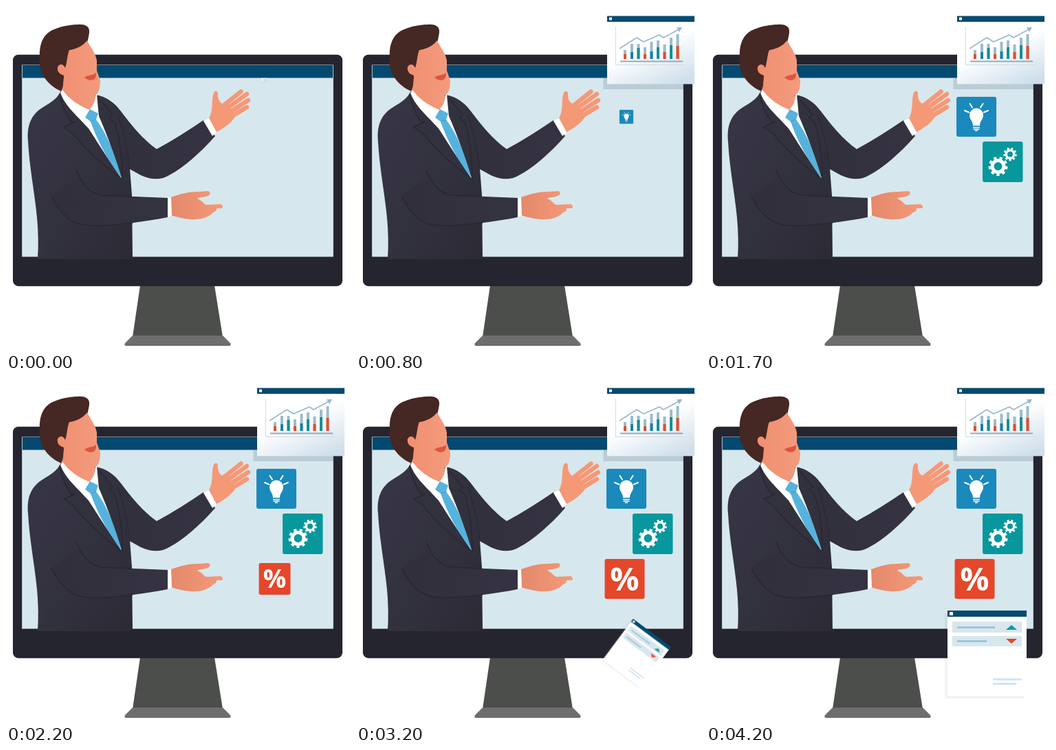
Recreate the animation shown at these times as an HTML page without scripts. Size 500 by 500 pixels, loop 5000 ms.

```html
<!DOCTYPE html>
<html lang="en">
<head>
<meta charset="utf-8">
<title>Presenter on screen</title>
<style>
  html, body { margin: 0; width: 100%; height: 100%; overflow: hidden; background: #fff; }
  svg { display: block; width: 100%; height: 100%; }
  .pop { animation: 5s step-end infinite; }
  .chart { animation-name: chart; transform-origin: 372px 110px; }
  .bulb { animation-name: bulb; transform-origin: 393px 161px; }
  .gears { animation-name: gears; transform-origin: 430.5px 226.5px; }
  .percent { animation-name: percent; transform-origin: 390.5px 292px; }
  .paper { animation-name: paper; transform-origin: 408px 400px; }

  /* every ramp advances once per 100 ms */
  @keyframes chart {
    0% { transform: scale(.063); animation-timing-function: steps(6); }
    12% { transform: scale(.938); }
    14%, 100% { transform: scale(1); }
  }
  @keyframes bulb {
    0% { transform: scale(0); }
    14% { transform: scale(.16); animation-timing-function: steps(4); }
    22% { transform: scale(.91); }
    24%, 100% { transform: scale(1); }
  }
  @keyframes gears {
    0% { transform: scale(0); }
    24% { transform: scale(.12); animation-timing-function: steps(4); }
    32% { transform: scale(.88); }
    34%, 100% { transform: scale(1); }
  }
  @keyframes percent {
    0% { transform: scale(0); }
    36% { transform: scale(.04); animation-timing-function: steps(5); }
    46% { transform: scale(.98); }
    48%, 100% { transform: scale(1); }
  }
  @keyframes paper {
    0% { transform: rotate(90deg) scale(0); }
    48% { transform: rotate(90deg) scale(.01); animation-timing-function: steps(13); }
    74% { transform: rotate(3.3deg) scale(.963); }
    76%, 100% { transform: rotate(0deg) scale(1); }
  }
</style>
</head>
<body>
<svg viewBox="0 0 500 500" xmlns="http://www.w3.org/2000/svg">
  <defs>
    <linearGradient id="suit" x1="0" y1="0" x2="1" y2="1">
      <stop offset="0" stop-color="#383646"/>
      <stop offset=".55" stop-color="#32313e"/>
      <stop offset="1" stop-color="#2b2a35"/>
    </linearGradient>
    <linearGradient id="arm" x1="0" x2="1">
      <stop offset="0" stop-color="#302f3b"/>
      <stop offset="1" stop-color="#353342"/>
    </linearGradient>
    <linearGradient id="skin" x1="0" x2="1">
      <stop offset="0" stop-color="#f08f70"/>
      <stop offset="1" stop-color="#f39b7d"/>
    </linearGradient>
    <linearGradient id="palm" x1="0" x2="1">
      <stop offset="0" stop-color="#e4896b"/>
      <stop offset="1" stop-color="#f59a78"/>
    </linearGradient>
    <linearGradient id="sheet" x1=".25" y1="0" x2=".8" y2="1">
      <stop offset=".45" stop-color="#fff"/>
      <stop offset="1" stop-color="#cfdfeb"/>
    </linearGradient>
  </defs>

  <!-- monitor -->
  <path d="M195 406H303L315 481H184Z" fill="#4c4e4c"/>
  <path d="M184 479H315L326 490Q328 494 324 494H175Q171 494 173 490Z" fill="#6d6e6d"/>
  <rect x="10" y="70.700" width="479" height="336.500" rx="8" fill="#25252f"/>
  <rect x="23.200" y="85.500" width="452.600" height="279" fill="#d7e7ee"/>
  <path d="M24 86H475V104.500H24Z" fill="#04496f"/>

  <!-- jacket and raised arm -->
  <path d="M130 129C147 132 158 141 167 153C182 173 199 194 219 208C243 195 266 180 287 166L304 189C282 214 258 235 237 246C226 253 211 253 196 246L178 236Z" fill="url(#arm)"/>
  <path d="M80 123C76 133 66 140 54 147C37 157 30 173 32 196C34 234 41 268 45 307Q48 338 46 368H184L183 275L180 236L174 190L160 150C152 138 142 131 130 129Z" fill="url(#suit)"/>
  <path d="M162 158Q174 190 180 237" fill="none" stroke="#2a2934" stroke-width="1.500"/>

  <!-- head -->
  <path d="M83 125C62 117 46 98 49 74C48 53 56 39 70 34C82 29 94 27 104 27C117 26 122 31 121 39C120 45 119 49 118 54L96 100L84 103Z" fill="#452723"/>
  <path d="M118 50C122 59 130 68 132 79L132 94L137 108C137 119 135 128 129 129L132 140L121 152C104 148 88 139 80 124C84 117 84 108 84 101C77 99 74 94 75 89C77 84 83 83 86 90C89 82 89 70 92 64C101 63 112 58 118 50Z" fill="url(#skin)"/>
  <path d="M114 104C120 99 125 102 131 97Q132 107 124 108Q119 108 114 104Z" fill="#dc553f"/>

  <!-- shirt and tie -->
  <path d="M78 128L82 122Q96 141 121 151Q130 142 130 129L133 129L137 155L155 200L169 253L116 176Q88 158 78 128Z" fill="#fff"/>
  <path d="M122 150L134 156L131 165C148 188 160 218 169 252C149 226 133 197 123 168L115 162Z" fill="#56b3de"/>
  <path d="M123 168L131 165" stroke="#3f9fcb" stroke-width="1"/>
  <path d="M79 126C86 146 104 160 120 178C138 206 154 231 169 253C149 238 121 210 98 185L84 176L101 169L94 168Q80 147 77 128Z" fill="#32313e"/>
  <path d="M132 129C147 145 155 165 158 184Q166 220 169 253C160 222 148 190 135 160Z" fill="#32313e"/>
  <path d="M78 128Q82 151 95 169L101 168L84 176L98 186Q122 217 169 252M136 135L155 158L150 163L158 169Q169 203 169 252" fill="none" stroke="#282732" stroke-width="1.500"/>

  <!-- lowered arm -->
  <path d="M106 248C116 266 125 273 139 275L236 279L235 307C194 315 148 321 116 318C92 315 78 296 66 276Z" fill="url(#arm)"/>
  <path d="M102 238C112 263 123 272 139 275L183 277M66 277C81 304 95 318 119 319Q151 320 184 315" fill="none" stroke="#292833" stroke-width="1.800"/>

  <!-- cuffs and hands -->
  <path d="M295 163C302 151 298 136 302 126Q305 121 308 126Q307 137 314 142L321 139L333 161C328 169 318 177 306 183Z" fill="#f59876"/>
  <path d="M317 144L341.500 124.500M321 149L350 128M324 155L352 137M327 161L350 147" stroke="#f59876" stroke-width="6.400" stroke-linecap="round"/>
  <path d="M287 167L295 163L306 184L300 189Z" fill="#fff"/>
  <path d="M240 278C254 273 264 270 279 270L294 269Q299 271 295 275C289 279 282 277 278 280C285 282 286 287 291 289L312 288Q317 291 314 294L306 294Q307 298 301 300C293 309 280 311 267 310Q251 308 240 304Z" fill="url(#palm)"/>
  <path d="M235 278.500H240L241 304L235 307Z" fill="#fff"/>

  <!-- chart window -->
  <g class="pop chart">
    <path d="M359.500 105H486V121H359.500Z" fill="#183b4e" opacity=".15"/>
    <path d="M365 14H492V113.500H365Z" fill="url(#sheet)"/>
    <path d="M365 14.500H492V23H365Z" fill="#064a70"/>
    <rect x="368" y="16.500" width="4" height="4" rx=".6" fill="#fff"/>
    <path d="M377.500 30V85.500H478" fill="none" stroke="#d3dce3"/>
    <path d="M384 80.500H475" stroke="#8eabc0" stroke-width="2"/>
    <g fill="none" stroke-width="4">
      <path d="M391 77V64M401 77V55M410.500 77V55M420 77V60M429.500 77V52M439 77V50M448.500 77V56M458 77V46M467.500 77V41" stroke="#9bbccd"/>
      <path d="M391 77V70M420 77V70M448.500 77V67M467.500 77V58" stroke="#e34d2a"/>
      <path d="M401 77V67M429.500 77V66" stroke="#187fae"/>
      <path d="M410.500 77V61M439 77V60M458 77V57" stroke="#168e98"/>
    </g>
    <path d="M383 62L408 46L418 52L441 42L447 46L471 33" fill="none" stroke="#9bb9cf" stroke-width="1.800"/>
    <path d="M466 31L474 31L470 38Z" fill="#9bb9cf"/>
  </g>

  <!-- idea tile -->
  <g class="pop bulb">
    <rect x="364" y="132" width="58" height="58" rx="3" fill="#1a89bb"/>
    <path d="M388 174C388 167 383 165 383 158.500A10 10 0 0 1 403 158.500C403 165 398 167 398 174Z" fill="#fff"/>
    <path d="M388 176.500H398M388.500 179H397.500M391 181.300H395" stroke="#fff" stroke-width="1.600"/>
    <path d="M376 152L382 154.500M383.500 142L387 147.500M402.500 142L399 147.500M410 152L404 154.500" stroke="#fff" stroke-width="2" stroke-linecap="round"/>
  </g>

  <!-- gears tile -->
  <g class="pop gears">
    <rect x="402" y="197" width="58.500" height="59" rx="3" fill="#07979d"/>
    <g fill="none" stroke="#fff">
      <circle cx="424.500" cy="233" r="8.500" stroke-width="5"/>
      <circle cx="424.500" cy="233" r="12" stroke-width="4" pathLength="18" stroke-dasharray="1 1"/>
      <circle cx="442" cy="215.500" r="5.700" stroke-width="3.400"/>
      <circle cx="442" cy="215.500" r="8.300" stroke-width="3" pathLength="18" stroke-dasharray="1 1"/>
    </g>
  </g>

  <!-- percent tile -->
  <g class="pop percent">
    <rect x="361.500" y="263" width="58" height="58" rx="3" fill="#e5472a"/>
    <text x="390.500" y="309" fill="#fff" font-family="'Open Sans','Noto Sans',sans-serif" font-size="47" font-weight="700" text-anchor="middle">%</text>
  </g>

  <!-- list window -->
  <g class="pop paper">
    <path d="M347 342H462V466H347Z" fill="#22313c" opacity=".06"/>
    <path d="M351 338H466V462H351Z" fill="#fff"/>
    <path d="M351 338H466V347H351Z" fill="#064a70"/>
    <rect x="354" y="340" width="5" height="5" rx=".6" fill="#fff"/>
    <path d="M358 354H459V370H358ZM358 375H459V390H358Z" fill="#d8e7ee"/>
    <path d="M365 362.500H420M365 382.500H408" stroke="#9fc4db" stroke-width="3"/>
    <path d="M436 366L444 359L452 366Z" fill="#13999d"/>
    <path d="M436 379L444 386L452 379Z" fill="#e5472a"/>
    <path d="M417 438H459M417 444.500H451" stroke="#d2e4ef" stroke-width="3"/>
  </g>
</svg>
</body>
</html>
```
